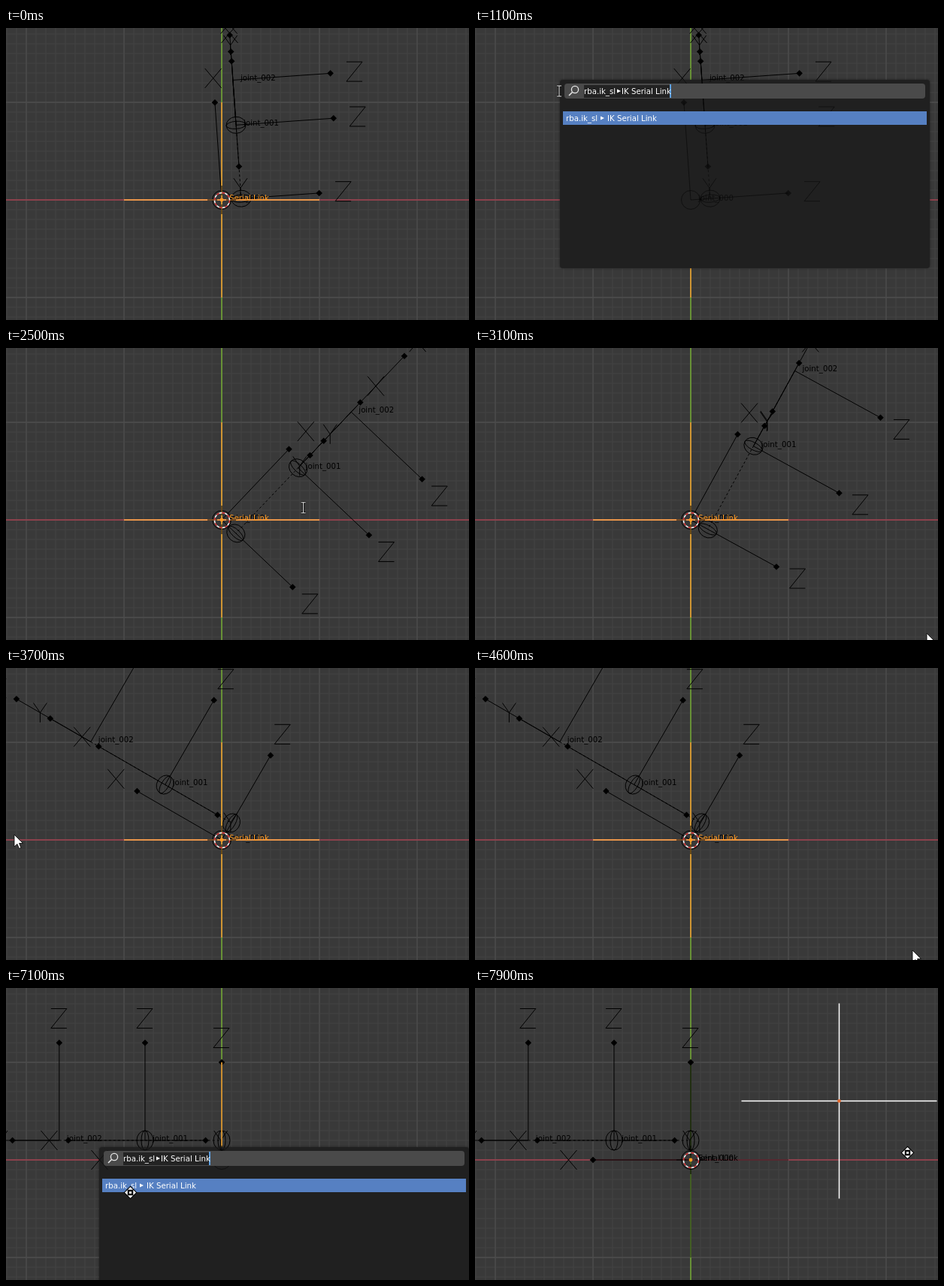
Write an HTML page with a canvas that moves like this. It is 616x389 px and loops after 8000 ms.

```html
<!DOCTYPE html>
<html lang="en">
<head>
<meta charset="utf-8">
<title>Serial link</title>
<style>
  html, body { margin: 0; width: 100%; height: 100%; overflow: hidden; background: #393939; }
  canvas { display: block; width: 616px; height: 389px; }
</style>
</head>
<body>
<canvas id="view" width="616" height="389"></canvas>
<script>
const LOOP = 8000, TICK = 100, W = 616, H = 389;
const OX = 287, OY = 229, UNIT = 130, LIFT = 26, RAD = Math.PI / 180;
const ORANGE = '#ff9a22';
const ctx = document.getElementById('view').getContext('2d');

const linear = p => p;
const easeInOut = p => p < .5 ? 4 * p ** 3 : 1 - 4 * (1 - p) ** 3;

const move = (from, to, ...goal) => ({ from, to, goal });

// base angle and the turn of both joints
const POSE = [94, 41, -62.5];
const SWINGS = [
  move(1400, 2100, 46.5, 22.4, -37.8),
  move(3000, 3700, 150, -38.3, 28.6),
  move(4700, 5300, 180, -38.3, 28.6)
];

const ENTRY = [477, 103];
const GLIDES = [
  move(100, 300, 200, 229),
  move(600, 800, 112, 84),
  move(1400, 2100, 298, 135),
  move(2200, 2900, 608, 382),
  move(3000, 3700, 11, 222),
  move(3900, 4600, 582, 376),
  move(4700, 5300, 113, 386),
  move(5700, 5900, 144, 370),
  move(6100, 6300, 123, 227),
  move(6400, 7100, 165, 272),
  move(7100, 7400, 592, 303),
  move(7700, 7900, 575, 219)
];

function follow(first, moves, t, ease) {
  return moves.reduce((now, { from, to, goal }) => {
    const p = ease(Math.min(1, Math.max(0, (t - from) / (to - from))));
    return now.map((v, i) => v + (goal[i] - v) * p);
  }, first);
}

function line(color, width, ...pts) {
  ctx.strokeStyle = color;
  ctx.lineWidth = width;
  ctx.beginPath();
  for (let i = 0; i < pts.length; i += 2) ctx.lineTo(pts[i], pts[i + 1]);
  ctx.stroke();
}

function poly(fill, ...pts) {
  ctx.fillStyle = fill;
  ctx.beginPath();
  for (let i = 0; i < pts.length; i += 2) ctx.lineTo(pts[i], pts[i + 1]);
  ctx.closePath();
  ctx.fill();
}

function box(fill, x, y, w, h, r) {
  ctx.fillStyle = fill;
  ctx.beginPath();
  ctx.roundRect(x, y, w, h, r);
  ctx.fill();
}

function text(s, x, y, color) {
  ctx.font = '10.2px "DejaVu Sans", sans-serif';
  ctx.fillStyle = color;
  ctx.fillText(s, x, Math.round(y));
}

function ring(x, y, rx, ry, turn = 0) {
  ctx.strokeStyle = '#000';
  ctx.lineWidth = 1;
  ctx.beginPath();
  ctx.ellipse(x, y, rx, ry, turn, 0, 7);
  ctx.stroke();
}

function dot(x, y, r, color = ORANGE) {
  ctx.fillStyle = color;
  ctx.beginPath();
  ctx.arc(x, y, r, 0, 7);
  ctx.fill();
}

function plus(x, y, across, down, width) {
  line(across, width, x - UNIT, y, x + UNIT, y);
  line(down, width, x, y - UNIT, x, y + UNIT);
}

function drawGrid() {
  ctx.fillStyle = '#393939';
  ctx.fillRect(0, 0, W, H);
  for (const [color, step] of [['#414141', UNIT / 10], ['#4c4c4c', UNIT]]) {
    for (let x = OX % step; x < W; x += step) line(color, 1.3, x, 0, x, H);
    for (let y = OY % step; y < H; y += step) line(color, 1.3, 0, y, W, y);
  }
  line('#a03f4e', 1.7, 0, OY, W, OY);
  line('#6b9a35', 1.8, OX, 0, OX, H);
}

function letter(c, x, y) {
  if (c === 'X') {
    line('#000', 1, x - 11, y - 13, x + 11, y + 13);
    line('#000', 1, x + 11, y - 13, x - 11, y + 13);
  } else if (c === 'Y') {
    line('#000', 1, x - 9, y - 13, x, y, x + 9, y - 13);
    line('#000', 1, x, y, x, y + 13);
  } else {
    line('#000', 1, x - 11, y - 13, x + 10, y - 13, x - 11, y + 13, x + 10, y + 13);
  }
}

function drawArm([angle, turn1, turn2]) {
  const c = Math.cos(angle * RAD), s = Math.sin(angle * RAD);
  const at = (u, v) => [OX + u * c + v * s, OY - u * s + v * c];
  const reach1 = UNIT * Math.cos(turn1 * RAD);
  const reach2 = reach1 + UNIT * Math.cos(turn2 * RAD);

  function arrow(name, u, v, du, dv) {
    const [x, y] = at(u + du, v + dv);
    line('#000', 1, ...at(u, v), x, y);
    poly('#000', x - 4.3, y, x, y - 4.3, x + 4.3, y, x, y + 4.3);
    letter(name, ...at(u + du * 1.25, v + dv * 1.25));
  }
  function ball(u) {
    const [x, y] = at(u, LIFT);
    ring(x, y, 11, 13, -angle * RAD);
    ring(x, y, 5, 13, -angle * RAD);
  }
  function joint(name, u, turn) {
    const [x, y] = at(u, LIFT);
    arrow('X', u, LIFT, UNIT * Math.cos(turn * RAD), 0);
    arrow('Y', u, LIFT, UNIT * Math.sin(turn * RAD), 0);
    arrow('Z', u, LIFT, 0, UNIT);
    text(name, x + 10, y + 1, '#000');
  }

  arrow('X', 0, 0, UNIT, 0);
  arrow('Z', 0, 0, 0, UNIT);
  ring(OX, OY, 12.5, 12.5);
  ball(0);
  ball(reach1);
  ctx.setLineDash([3, 3]);
  line('#000', 1, ...at(reach2, LIFT), ...at(0, LIFT));
  ctx.setLineDash([]);
  joint('joint_001', reach1, turn1);
  joint('joint_002', reach2, turn2);
  text('joint_000', OX + 10, OY + 1, '#000');
}

function drawLink(selected) {
  if (selected) plus(OX, OY, '#e8944a', '#dc9634', 1.8);
  else plus(OX, OY, 'rgba(0,0,0,.5)', 'rgba(0,0,0,.5)', 1.4);
  text('Serial Link', OX + 10, OY + 1, selected ? ORANGE : '#000');
}

function drawCursor3d() {
  for (let i = 0; i < 4; i++) {
    const dx = Math.cos(i * 90 * RAD), dy = Math.sin(i * 90 * RAD);
    line('#000', 1, OX + dx * 6, OY + dy * 6, OX + dx * 19, OY + dy * 19);
  }
  for (let i = 0; i < 16; i++) {
    ctx.strokeStyle = i % 2 ? '#fff' : '#e8383c';
    ctx.lineWidth = 1.4;
    ctx.beginPath();
    ctx.arc(OX + .5, OY + .5, 10, i * Math.PI / 8, (i + 1) * Math.PI / 8);
    ctx.stroke();
  }
  dot(OX, OY, 2.4);
}

function drawTarget(x, y) {
  plus(x, y, '#fff', '#fff', 1.5);
  dot(x, y, 2.3, '#e8692c');
}

function drawSearch(x, y, pose) {
  ctx.save();
  ctx.shadowColor = 'rgba(0,0,0,.5)';
  ctx.shadowBlur = 3;
  box('#202020', x, y, 492, 251, 4);
  ctx.restore();

  // the arm shows faintly through the panel
  ctx.save();
  ctx.clip();
  ctx.globalAlpha = .5;
  drawArm(pose);
  ctx.restore();

  box('#4a4a4a', x + 6, y + 5, 480, 20, 4);
  box('#232323', x + 32, y + 7, 115, 17, 0);
  box('#5c9fe0', x + 146, y + 6, 2, 18, 0);
  ctx.strokeStyle = '#e6e6e6';
  ctx.lineWidth = 1.3;
  ctx.beginPath();
  ctx.arc(x + 20, y + 13, 4.6, 0, 7);
  ctx.stroke();
  line('#e6e6e6', 1.6, x + 16.5, y + 16.5, x + 12, y + 21);
  box('#5680c2', x + 4, y + 42, 484, 18, 0);
  entry(x + 32, y + 19, 44, 50);
  entry(x + 8, y + 55, 46, 55);
}

function entry(x, y, mark, label) {
  text('rba.ik_sl', x, y, '#fff');
  poly('#fff', x + mark, y - 6.5, x + mark + 5, y - 4, x + mark, y - 1.5);
  text('IK Serial Link', x + label, y, '#fff');
}

function drawArrow(x, y) {
  poly('#fff', x, y, x, y + 16, x + 4, y + 12.5, x + 6.5, y + 18.5, x + 9, y + 17.5, x + 6.5, y + 11.5, x + 11.5, y + 11.5);
  ctx.strokeStyle = '#000';
  ctx.lineWidth = .8;
  ctx.stroke();
}

function drawBeam(x, y) {
  for (const [color, width] of [['#111', 3], ['#e8e8e8', 1]]) {
    line(color, width, x, y - 7, x, y + 7);
    line(color, width, x - 3, y - 7, x + 3, y - 7);
    line(color, width, x - 3, y + 7, x + 3, y + 7);
  }
}

function drawMover(x, y) {
  ctx.save();
  ctx.translate(x + .5, y + .5);
  for (const [color, rim] of [['#000', 2.4], ['#fff', .4]]) {
    for (let i = 0; i < 4; i++) {
      poly(color, 0, -7.3, 3.2, -4, -3.2, -4);
      ctx.strokeStyle = color;
      ctx.lineWidth = rim;
      ctx.stroke();
      ctx.rotate(Math.PI / 2);
    }
  }
  box('#000', -3, -3, 6, 6, 0);
  box('#fff', -1.5, -1.5, 3, 3, 0);
  ctx.restore();
}

function drawPointer(t, x, y) {
  if (t < 100) return;
  if (t >= 7100) drawMover(x, y);
  else if ((t >= 1100 && t < 3100) || t === 6400) drawBeam(x, y);
  else drawArrow(x, y);
}

function draw(t) {
  const pose = follow(POSE, SWINGS, t, linear);
  const [x, y] = follow(ENTRY, GLIDES, t, easeInOut);
  const grabbing = t >= 7200;
  drawGrid();
  drawArm(pose);
  drawLink(!grabbing);
  drawCursor3d();
  if (grabbing) drawTarget(x - 90.5, y - 68.5);
  if (t >= 1100 && t < 1500) drawSearch(113, 69, pose);
  if (t >= 6400 && t < 7200) drawSearch(124, 212, pose);
  drawPointer(t, x, y);
}

const start = performance.now();
function tick(now) {
  const t = Math.max(0, now - start) % LOOP;
  draw(Math.floor(t / TICK) * TICK);
  requestAnimationFrame(tick);
}
draw(0);
requestAnimationFrame(tick);
</script>
</body>
</html>
```
